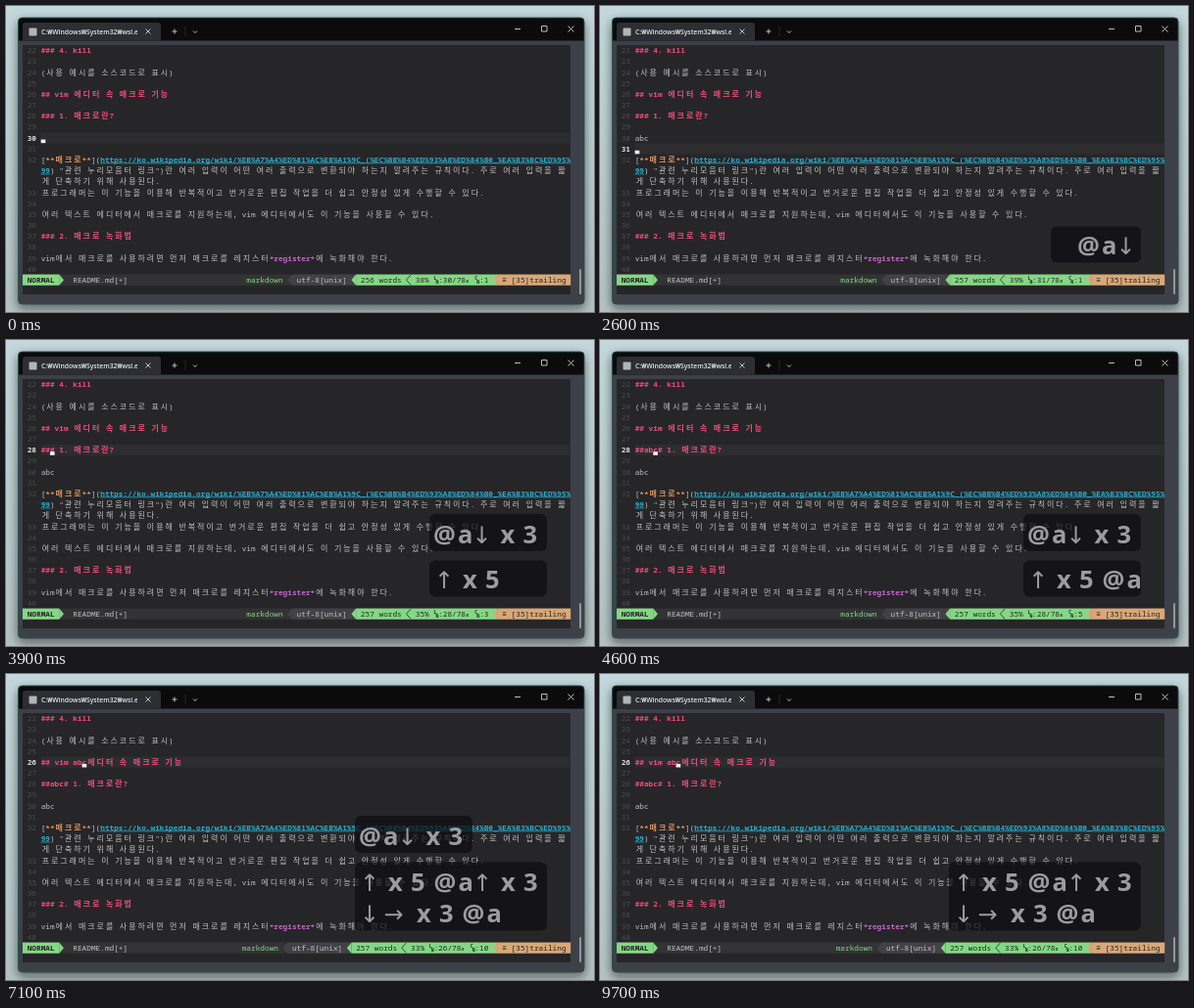
An HTML page that plays this animation: 600x313 px, repeating every 9.8 s.

```html
<!DOCTYPE html>
<html lang="ko">
<head>
<meta charset="utf-8">
<title>vim macro</title>
<style>
html, body { margin: 0; width: 100%; height: 100%; overflow: hidden; background: #b9cace; }
svg { display: block; width: 600px; height: 313px; }
.mono { font: 500 7.77px "Noto Sans Mono", "DejaVu Sans Mono", monospace; }
.hangul { font: 8px "Noto Sans CJK KR", "Noto Sans CJK", "Noto Sans CJK JP", sans-serif; }
.mono.bold { font-weight: 700; }
.hangul.bold { font-weight: 700; }
.title { font: 600 6.8px "Open Sans", "Noto Sans", sans-serif; }
.key { font: 700 25.5px "Open Sans", "Noto Sans", sans-serif; fill: #9c9c9f; }
.arrow { font: 400 24px "DejaVu Sans", sans-serif; text-anchor: middle; fill: #9c9c9f; }
.tiny { font: 700 4.8px "Noto Sans Mono", monospace; }
</style>
</head>
<body>
<svg viewBox="0 0 600 313">
  <defs>
    <linearGradient id="desk" x2="0" y2="1">
      <stop offset="0" stop-color="#c3d7dc"/>
      <stop offset="1" stop-color="#b3c2c3"/>
    </linearGradient>
    <filter id="shade" x="-6%" y="-10%" width="112%" height="122%">
      <feDropShadow dx="0" dy="4" stdDeviation="5.5" flood-color="#101818" flood-opacity=".6"/>
    </filter>
    <clipPath id="frame"><rect x="12.5" y="12" width="577.5" height="293" rx="4"/></clipPath>
    <clipPath id="tab"><rect x="34" y="16" width="100" height="22"/></clipPath>
  </defs>
  <rect width="600" height="313" fill="url(#desk)"/>
  <rect x="12.5" y="12" width="577.5" height="293" rx="4" fill="#3e4148" filter="url(#shade)"/>
  <g clip-path="url(#frame)">
    <rect x="12" y="12" width="579" height="23.500" fill="#0b0b0c"/>
    <path d="M17 35.500V20q0-3 3-3H155q3 0 3 3V35.500Z" fill="#2c2e33"/>
    <rect x="17" y="40" width="559" height="255" fill="#262628"/>
    <rect x="585" y="269" width="2" height="26" rx="1" fill="#96969a"/>
  </g>
  <rect x="12.5" y="12" width="577.5" height="293" rx="4" fill="none" stroke="#24504e" stroke-width=".9"/>
  <rect x="23.500" y="22.500" width="8" height="8" rx="1" fill="#b4b4b4"/>
  <text class="title" x="36" y="28.500" fill="#e6e6e6" clip-path="url(#tab)">C:₩Windows₩System32₩wsl.exe</text>
  <g fill="none" stroke="#d0d0d0" stroke-width=".9">
    <path d="M142.500 23.500l5 5m0-5l-5 5M169.500 26h5m-2.500-2.500v5M191 25.500l2 2 2-2"/>
    <path d="M183 21v10" stroke="#2a2a2c"/>
    <path d="M519 23.500h6M546.500 20.500h5.500v5.500h-5.500ZM573.500 20.500l6 6m0-6l-6 6"/>
  </g>
  <g id="screen"></g>
  <g id="keys"></g>
</svg>
<script>
const LOOP = 9800, LEFT = 17, TOP = 40, CW = 4.66, RH = 11.17;
const INK = '#c0c0c0', PINK = '#f04c78', CYAN = '#2aabcc', ORANGE = '#dc935c',
  VIOLET = '#c565c9', GREEN = '#84d884', PEACH = '#d9a878', DARK = '#222624';
const screen = document.getElementById('screen'), keys = document.getElementById('keys');

const isWide = c => c >= '가' && c <= '힣';
const span = s => [...s].reduce((n, c) => n + (isWide(c) ? 2 : 1), 0);
const px = col => LEFT + col * CW;
const py = row => TOP + row * RH;
const rect = (x, y, w, h, fill) => `<rect x="${x}" y="${y}" width="${w}" height="${h}" fill="${fill}"/>`;

// Text on the terminal grid; Hangul takes two cells.
function put(s, col, row, fill = INK, bold = false) {
  let out = '';
  for (const m of s.matchAll(/[가-힣]+|[^가-힣 ]+/g)) {
    const wide = isWide(m[0][0]), from = col + span(s.slice(0, m.index));
    const xs = [...m[0]].map((_, i) => (px(from + i * (wide ? 2 : 1)) + (wide ? 1 : 0)).toFixed(2));
    out += `<text class="${wide ? 'hangul' : 'mono'}${bold ? ' bold' : ''}" fill="${fill}" x="${xs.join(' ')}" y="${(py(row) + 8.3).toFixed(2)}">${m[0]}</text>`;
  }
  return out;
}

function link(s, col, row) {
  const y = py(row) + 9.1;
  return put(s, col, row, CYAN, true) +
    `<path d="M${px(col)} ${y}H${px(col + span(s))}" stroke="${CYAN}" stroke-width=".8"/>`;
}

// Each part: [text, colour, bold, is link]
function parts(list, row) {
  let col = 4, out = '';
  for (const [s, fill, bold, linked] of list) {
    out += linked ? link(s, col, row) : put(s, col, row, fill, bold);
    col += span(s);
  }
  return out;
}

const rowOf = line => line - 22 + (line > 32 ? 2 : 0);

const BODY = {
  22: '### 4. kill',
  24: '(사용 예시를 소스코드로 표시)',
  33: '프로그래머는 이 기능을 이용해 반복적이고 번거로운 편집 작업을 더 쉽고 안정성 있게 수행할 수 있다.',
  35: '여러 텍스트 에디터에서 매크로를 지원하는데, vim 에디터에서도 이 기능을 사용할 수 있다.',
  37: '### 2. 매크로 녹화법'
};
const URL_HEAD = 'https://ko.wikipedia.org/wiki/%EB%A7%A4%ED%81%AC%EB%A1%9C_(%EC%BB%B4%ED%93%A8%ED%84%B0_%EA%B3%BC%ED%95%';
const FIXED =
  parts([['['], ['**매크로**', ORANGE, true], [']('], [URL_HEAD, CYAN, true, true]], 10) +
  parts([['99', CYAN, true, true], [') "관련 누리모음터 링크")란 여러 입력이 어떤 여러 출력으로 변환되야 하는지 알려주는 규칙이다. 주로 여러 입력을 짧']], 11) +
  put('게 단축하기 위해 사용된다.', 4, 12) +
  parts([['vim에서 매크로를 사용하려면 먼저 매크로를 레지스터'], ['*register*', VIOLET, true], ['에 녹화해야 한다.']], 19);

// Cursor: [time, line, column, macro runs so far]
const MOVES = [
  [0, 30, 1, 0], [1000, 30, 3, 1], [1800, 31, 1, 1], [2700, 32, 3, 1], [2900, 33, 3, 1],
  [3200, 32, 3, 1], [3300, 31, 1, 1], [3500, 30, 3, 1], [3600, 29, 1, 1], [3700, 28, 3, 1],
  [4400, 28, 5, 2], [4800, 27, 1, 2], [5000, 26, 5, 2], [5200, 25, 1, 2], [5400, 26, 5, 2],
  [5700, 26, 6, 2], [5800, 26, 7, 2], [5900, 26, 8, 2], [6500, 26, 10, 3]
];

// Key label: [time, box left, text left, lines]
const UP = '↑ x 5 @a↑ x 3';
const LABELS = [
  [0], [800, 460, 520, '@'], [1000, 460, 507, '@a'], [1800, 460, 487, '@a↓'],
  [2700, 432, 436, '@a↓ x 2'], [2900, 432, 436, '@a↓ x 3'],
  [3500, 432, 437, '↑'], [3600, 432, 437, '↑ x 3'], [3700, 432, 437, '↑ x 4'], [3800, 432, 437, '↑ x 5'],
  [4200, 432, 437, '↑ x 5 @'], [4400, 432, 437, '↑ x 5 @a'],
  [4800, 412, 417, '↑ x 5 @a↑'], [5000, 356, 361, '↑ x 5 @a↑ x 2'], [5200, 356, 361, UP],
  [5400, 356, 361, UP, '↓'], [5700, 356, 361, UP, '↓→'], [5800, 356, 361, UP, '↓→ x 2'],
  [5900, 356, 361, UP, '↓→ x 3'], [6200, 356, 361, UP, '↓→ x 3 @'], [6500, 356, 361, UP, '↓→ x 3 @a']
];
const OLD_FROM = 3500, FADE = [8500, 9300];

const at = (table, t) => table.findLast(step => step[0] <= t);

function statusBar(line, col, runs) {
  const y = py(21), back = String(col).length - 1;
  const fill = (a, b, c) => rect(px(a), y, px(b) - px(a), RH, c);
  const wedge = (a, dir, c) => {
    const tip = dir > 0 ? a + 1 : a, base = dir > 0 ? a : a + 1;
    return `<path d="M${px(base)} ${y}L${px(tip)} ${y + RH / 2}L${px(base)} ${y + RH}Z" fill="${c}"/>`;
  };
  const tiny = (a, dx, dy, c) => `<text class="tiny" fill="${DARK}" x="${px(a) + dx}" y="${y + dy}">${c}</text>`;
  const pair = (a, c) => tiny(a, 0, 5.2, c) + tiny(a, 2, 9, 'N');
  const text = (s, c, color = DARK, bold = false) => put(s, c, 21, color, bold);
  const k = 58 - back;
  return fill(0, 120, '#333336') + fill(0, 8, GREEN) + wedge(8, 1, GREEN) +
    text('NORMAL', 1, DARK, true) + text('README.md[+]', 11, INK) +
    text('markdown', k - 9, GREEN) +
    wedge(k, -1, '#424246') + fill(k + 1, k + 15, '#424246') + text('utf-8[unix]', k + 2, INK) +
    wedge(k + 14, -1, GREEN) + fill(k + 15, 104, GREEN) +
    text(`${runs ? 257 : 256} words`, k + 16) +
    `<path d="M${px(k + 27)} ${y + .5}L${px(k + 26)} ${y + RH / 2}L${px(k + 27)} ${y + RH - .5}" fill="none" stroke="${DARK}" stroke-width=".8"/>` +
    text(`${Math.floor(line / 78 * 100)}%`, k + 28) + pair(k + 32, 'L') +
    text(`:${line}/78`, k + 33) + tiny(k + 39, .5, 8, '≡') +
    pair(k + 41, 'C') + text(`:${col}`, k + 42) +
    wedge(103, -1, PEACH) + fill(104, 120, PEACH) +
    text('≡', 105) + text('[35]trailing', 107);
}

function drawScreen([, line, col, runs]) {
  const row = rowOf(line);
  let out = rect(px(4), py(row), px(120) - px(4), RH * (line === 32 ? 3 : 1), '#2d2d30');
  for (let n = 22; n <= 40; n++)
    out += put(String(n), 1, rowOf(n), n === line ? '#dcdcdc' : '#4b4b4e', n === line);
  const text = {
    ...BODY,
    26: `## vim ${runs > 2 ? 'abc' : ''}에디터 속 매크로 기능`,
    28: `##${runs > 1 ? 'abc' : ''}# 1. 매크로란?`,
    30: runs ? 'abc' : ''
  };
  for (const n in text) {
    const head = text[n].startsWith('#');
    out += put(text[n], 4, rowOf(+n), head ? PINK : INK, head);
  }
  out += FIXED + statusBar(line, col, runs);
  out += rect(px(col + 3), py(row) + 7.2, CW, 3.6, '#f0f0f0');
  screen.innerHTML = out;
}

const ADVANCE = { '@': 25, a: 14.5, ' ': 9, x: 14, '→': 29 };

function keyLine(s, x, y) {
  let out = '';
  for (const c of s) {
    const arrow = '↑↓→'.includes(c), w = ADVANCE[c] || (arrow ? 20 : 14.5);
    if (c !== ' ') out += `<text class="${arrow ? 'arrow' : 'key'}" x="${arrow ? x + w / 2 : x}" y="${y}">${c}</text>`;
    x += w;
  }
  return out;
}

const plate = (x, y, w, h) =>
  `<rect x="${x}" y="${y}" width="${w}" height="${h}" rx="6" fill="#0d0c10" opacity=".7"/>`;

function drawKeys([time, left, textX, ...lines]) {
  if (!left) { keys.innerHTML = ''; return; }
  const top = 225.5 - 33 * (lines.length - 1);
  let out = plate(left, top, 552 - left, 262.5 - top);
  lines.forEach((s, i) => out += keyLine(s, textX, 254 - 32 * (lines.length - 1 - i)));
  if (time >= OLD_FROM) {
    const y = top - 47.5;
    out += `<g id="old">${plate(left, y, 120, 38)}${keyLine('@a↓ x 3', left + 4, y + 29.5)}</g>`;
  }
  keys.innerHTML = out;
}

let move, label;
function tick() {
  const t = performance.now() % LOOP;
  const m = at(MOVES, t), l = at(LABELS, t);
  if (m !== move) drawScreen(move = m);
  if (l !== label) drawKeys(label = l);
  const old = document.getElementById('old');
  if (old) old.setAttribute('opacity', Math.min(1, Math.max(0, (FADE[1] - t) / (FADE[1] - FADE[0]))));
  requestAnimationFrame(tick);
}
tick();
</script>
</body>
</html>
```
